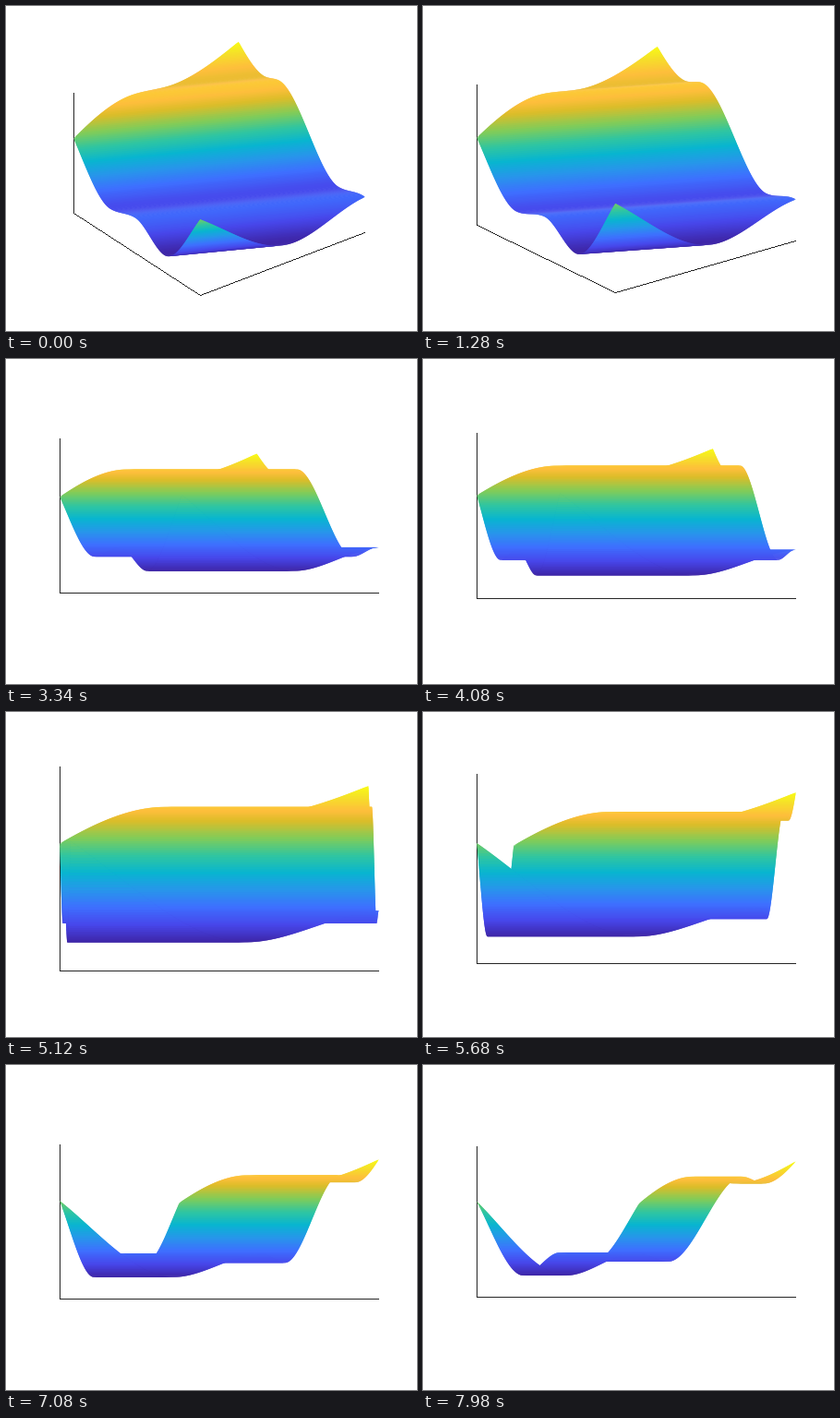
A matplotlib script that plays this animation: 445 by 352 pixels, repeating every 8000 ms.

```python
import numpy as np
import matplotlib.pyplot as plt
from matplotlib.animation import FuncAnimation
from matplotlib.collections import PolyCollection
from matplotlib.colors import LinearSegmentedColormap

W, H, DPI = 445, 352, 100
FRAMES, STEP_MS = 400, 20
CX, CY = 231.0, 170.0          # centre of the plot box on the stage
BOX_W, BOX_H = 345.4, 287.0    # room the rotated box may fill
Z_ASPECT = 0.6635
HOLD, TILT_STEPS, TURN_START = 33, 116, 150
AZ0, EL0, TURN_RATE = -37.5, 30.0, 0.3355
STRIPS = 240                   # divisible by 3, so rows hit the floor corners

# crests and troughs of the wave along s = y + x / 2; the outer two lie off the floor
TURNS_S = [-0.14, 0.285, 0.51, 0.715, 1.17, 1.305, 1.75]
TURNS_Z = [0.805, 0.142, 0.296, 0.235, 0.803, 0.757, 1.121]

PARULA = [(0, "#3e26a8"), (7, "#4747eb"), (14, "#3e6fff"), (21, "#2796eb"),
          (28, "#08b5d0"), (35, "#31c69f"), (42, "#81cc59"), (49, "#dcbd29"),
          (53, "#febe3c"), (59, "#f5e327"), (63, "#f9fb15")]


def height(s):
    """Ease smoothly from each turning point to the next."""
    pos = np.interp(s, TURNS_S, np.arange(len(TURNS_S)))
    k = np.floor(pos)
    t = pos - k
    return np.interp(k + t * t * (3 - 2 * t), np.arange(len(TURNS_Z)), TURNS_Z)


def view(i):
    el = EL0 * (1 - np.clip((i - HOLD) / TILT_STEPS, 0, 1))
    az = AZ0 + TURN_RATE * max(0, i - TURN_START)
    return np.radians(az), np.radians(el)


def project(p, az, el):
    """Orthographic projection of unit-box points, fitted to the stage."""
    ca, sa, ce, se = np.cos(az), np.sin(az), np.cos(el), np.sin(el)
    spread = abs(ca) + abs(sa)
    scale = min(BOX_W / spread, BOX_H / (se * spread + ce * Z_ASPECT))
    x, y, z = np.moveaxis(p - 0.5, -1, 0)
    right = x * ca + y * sa
    up = se * (y * ca - x * sa) + ce * Z_ASPECT * z
    return np.stack([CX + scale * right, CY - scale * up], axis=-1)


def pixel_line(corners):
    """Unit squares of a hard one-pixel polyline."""
    ends = np.floor(corners)
    cells = []
    for a, b in zip(ends[:-1], ends[1:]):
        n = int(np.abs(b - a).max()) + 1
        cells.append(np.round(np.linspace(a, b, n)))
    square = np.array([(0, 0), (1, 0), (1, 1), (0, 1)])
    return np.concatenate(cells)[:, None] + square


# rows of the surface, farthest first
s = np.linspace(1.5, 0, STRIPS + 1)
z = height(s)
x_lo, x_hi = np.clip(2 * (s - 1), 0, 1), np.clip(2 * s, 0, 1)
lo = np.stack([x_lo, s - x_lo / 2, z], axis=-1)
hi = np.stack([x_hi, s - x_hi / 2, z], axis=-1)

# each strip reaches under the next one, which hides the seams
top = np.arange(STRIPS)
low = np.minimum(top + 2, STRIPS)
quads = np.stack([lo[top], hi[top], hi[low], lo[low]], axis=1)

cmap = LinearSegmentedColormap.from_list(
    "parula", [(k / 63, c) for k, c in PARULA], N=256)
mid = (z[:-1] + z[1:]) / 2
colors = cmap((mid - z.min()) / (z.max() - z.min()))

fig = plt.figure(figsize=(W / DPI, H / DPI), dpi=DPI, facecolor="white")
ax = fig.add_axes([0, 0, 1, 1])
ax.set_xlim(0, W)
ax.set_ylim(H, 0)
ax.axis("off")

box_lines = PolyCollection([], facecolors="#262626", linewidths=0, zorder=1)
surface = PolyCollection([], facecolors=colors, linewidths=0, zorder=2)
for part in (box_lines, surface):
    ax.add_collection(part, autolim=False)


def draw(i):
    az, el = view(i)
    surface.set_verts(project(quads, az, el))
    if az < 0:
        corners = [(0, 1, 1), (0, 1, 0), (0, 0, 0), (1, 0, 0)]
    else:
        corners = [(0, 0, 1), (0, 0, 0), (1, 0, 0), (1, 1, 0)]
    box_lines.set_verts(pixel_line(project(np.array(corners), az, el)))
    return surface, box_lines


anim = FuncAnimation(fig, draw, frames=FRAMES, interval=STEP_MS,
                     repeat=True, repeat_delay=0, blit=False)
plt.show()
```
